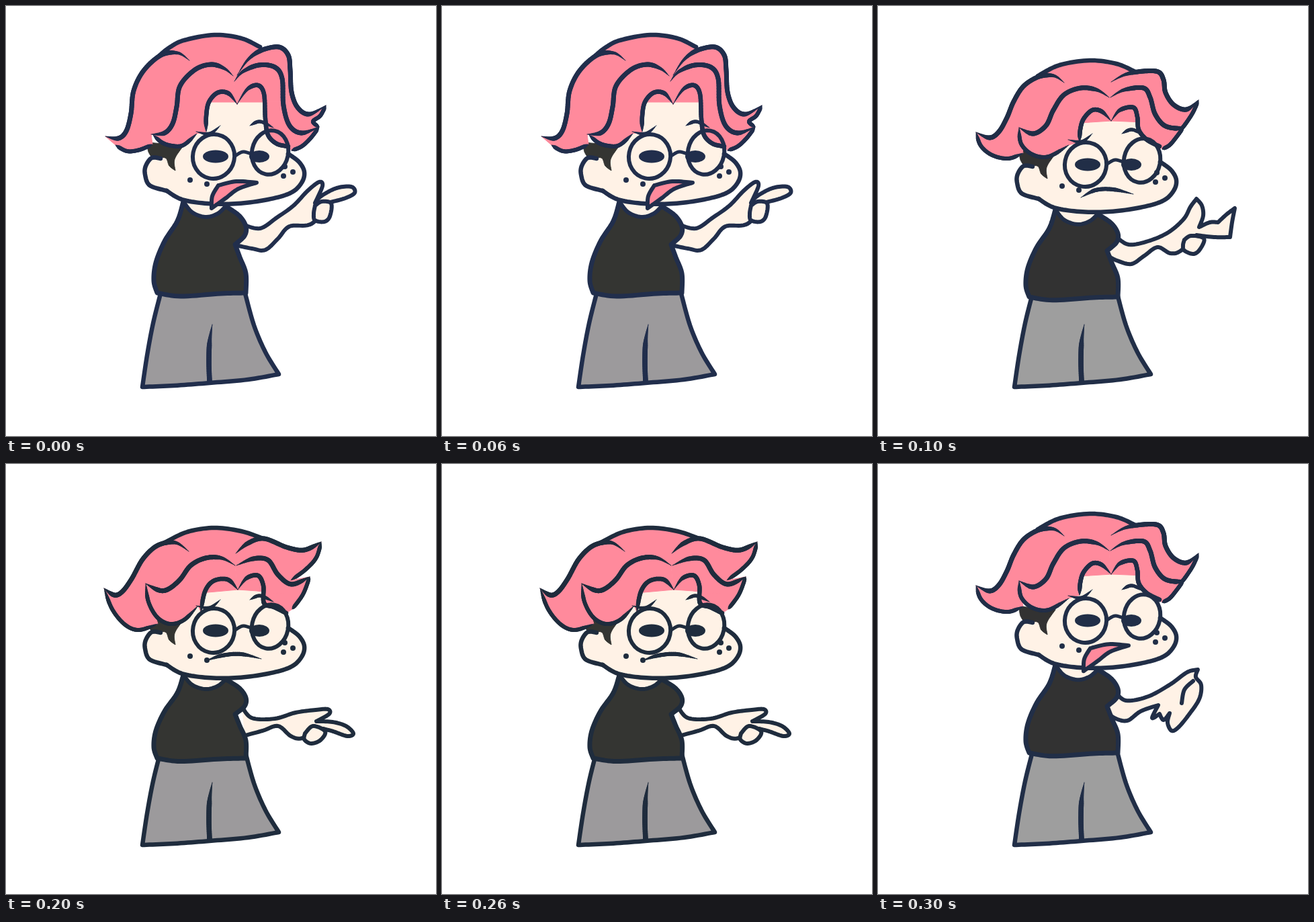
These frames come from a looping animation (640 by 640 pixels, 0.4 s). An HTML page with a canvas:

```html
<!DOCTYPE html>
<html lang="en">
<head>
<meta charset="utf-8">
<title>Pointing figure</title>
<style>
html, body { margin: 0; width: 100%; height: 100%; overflow: hidden; background: #fff; }
canvas { display: block; width: 640px; height: 640px; }
</style>
</head>
<body>
<canvas id="stage" width="640" height="640"></canvas>
<script>
const ctx = document.getElementById('stage').getContext('2d');
const PINK = '#ff8a9c', SKIN = '#fff2e6';
const STEP = 100;
let ink;

// Smooth curve through "x,y x,y"; "/" marks a sharp corner at the point before it.
function curve(text, dy = 0, scale = 1) {
  const out = [];
  let last = null;
  for (const part of text.split('/')) {
    const p = part.trim().split(/\s+/).map(s => {
      const [x, y] = s.split(',').map(Number);
      return [x, y * scale + dy];
    });
    if (last) p.unshift(last);
    last = p[p.length - 1];
    for (let i = 0; i < p.length - 1; i++) {
      const a = p[i - 1] || p[i], b = p[i], c = p[i + 1], d = p[i + 2] || c;
      for (let k = 0; k < 10; k++) {
        const t = k / 10;
        out.push([0, 1].map(n => b[n] + 0.5 * t * (c[n] - a[n] +
          t * (2 * a[n] - 5 * b[n] + 4 * c[n] - d[n] + t * (3 * (b[n] - c[n]) + d[n] - a[n])))));
      }
    }
    out.push(last);
  }
  return out;
}

function fill(color, ...parts) {
  ctx.beginPath();
  parts.flat().forEach(([x, y]) => ctx.lineTo(x, y));
  ctx.closePath();
  ctx.fillStyle = ctx.strokeStyle = color;
  ctx.lineWidth = 1;
  ctx.fill();
  ctx.stroke();
}

// Brush line; head and tail are the shares of the length that taper.
function line(pts, width = 6.5, head = 0, tail = 0) {
  ctx.strokeStyle = ink;
  if (!head && !tail) {
    ctx.beginPath();
    pts.forEach(([x, y]) => ctx.lineTo(x, y));
    ctx.lineWidth = width;
    ctx.stroke();
    return;
  }
  const n = pts.length - 1;
  for (let i = 0; i < n; i++) {
    const t = (i + 0.5) / n;
    const k = Math.min(1, head ? t / head : 1, tail ? (1 - t) / tail : 1);
    ctx.lineWidth = Math.max(1, width * k);
    ctx.beginPath();
    ctx.moveTo(...pts[i]);
    ctx.lineTo(...pts[i + 1]);
    ctx.stroke();
  }
}

function oval(x, y, rx, ry, tilt = 0, width = 0) {
  ctx.beginPath();
  ctx.ellipse(x, y, rx, ry, tilt, 0, Math.PI * 2);
  if (width) {
    ctx.lineWidth = width;
    ctx.strokeStyle = ink;
    ctx.stroke();
  } else {
    ctx.fillStyle = ink;
    ctx.fill();
  }
}

const hairUp = {
  cap: '228,74 243,62 265,51 310,43 350,48 378,61',
  left: '273,81 256,70 231,73 205,96 190,126 186,160 179,186 167,197 148,194',
  leftLow: '163,207 180,216 199,214 218,206',
  lockL: '338,104 325,93 305,87 281,95 259,119 254,150 248,175 236,189 216,191',
  lockLLow: '219,192 232,203 247,208 264,207 284,190',
  right: '344,103 360,80 380,66 406,61 420,73 423,95 425,128 434,151 451,161 476,148',
  rightLow: '476,148 468,163 457,172 466,180',
  lockR: '340,112 352,98 376,88 400,91 411,108 413,148 422,178 440,189 466,180',
  lockRLow: '466,180 454,196 440,209 425,215',
  faceL: '344,146 331,130 315,129 302,143 298,164 298,187',
  faceR: '344,146 359,124 375,118 384,131 386,168 390,192 403,205 420,209',
  edge: 143
};
const hairMid = {
  cap: '238,104 270,88 315,81 355,86 383,98',
  left: '277,114 262,104 240,105 217,119 202,142 192,166 180,187 166,196 146,188',
  leftLow: '146,188 153,208 170,222 194,227 216,219',
  lockL: '344,136 326,125 302,122 277,132 261,155 250,178 231,190 210,181',
  lockLLow: '210,181 213,205 230,221 254,224 284,207',
  right: '347,113 368,102 395,97 417,98 425,110 428,129 440,147 459,154 477,140',
  rightLow: '477,140 469,158 458,175 449,186',
  lockR: '346,136 366,125 395,122 405,136 412,160 425,177 442,182 455,180',
  lockRLow: '455,180 445,194 434,207 423,213',
  faceL: '347,171 333,157 319,155 306,168 301,184 300,202',
  faceR: '347,171 360,155 380,151 386,165 388,184 400,199 419,209',
  edge: 174
};
const hairLow = {
  cap: '236,117 270,101 310,95 350,100 380,110',
  left: '272,130 252,117 226,121 204,141 187,171 173,190 161,195 146,185',
  leftLow: '146,185 158,216 177,239 198,247 226,238',
  lockL: '341,151 321,140 297,140 275,151 259,172 242,186 228,188 208,178',
  lockLLow: '208,178 212,205 225,228 244,238 265,232 286,211',
  right: '342,133 360,118 384,111 418,124 444,128 469,116',
  rightLow: '469,116 462,139 446,157 424,173',
  lockR: '343,151 368,141 390,143 405,165 425,179 452,168',
  lockRLow: '452,168 442,194 426,216',
  faceL: '345,187 330,172 309,174 296,190 290,220',
  faceR: '345,187 358,170 375,166 383,181 384,207 399,213 417,222',
  edge: 192
};

const openMouth = '306,301 307,283 316,267 / 343,261 373,263 / 346,272 327,286 306,301';

const poses = [
  {
    ink: '#212e4c', shirt: '#343532', pants: '#9c9a9c',
    head: 0, dots: 0, top: 0, hem: 0, hair: hairUp, hairDy: 0, open: true,
    arm: '352,325 378,331 403,315 428,297 449,275 466,262 471,268 460,293 / 469,283 492,271 514,269 519,278 505,286 483,292 / 455,324 422,328 405,346 386,363 366,361 342,356',
    finger: '460,297 470,291 484,294 482,313 474,321 460,319 458,309 460,297'
  },
  {
    ink: '#212e47', shirt: '#323232', pants: '#9e9e9e',
    head: 12, dots: 9, top: 12, hem: 6, hair: hairMid, hairDy: 0,
    mouth: '302,285 324,274 350,273 380,280',
    arm: '354,343 373,355 402,350 432,337 455,317 465,299 474,287 / 482,297 484,312 478,329 / 494,322 506,322 / 519,310 531,301 / 527,322 524,344 / 500,344 474,341 / 451,364 435,368 416,359 396,372 377,384 356,379 344,373',
    finger: '456,348 466,342 485,346 480,361 470,369 456,364 454,356 456,348'
  },
  {
    ink: '#1f2c3d', shirt: '#343532', pants: '#9c9a9c',
    head: 24, dots: 27, top: 23, hem: 11, hair: hairLow, hairDy: 0,
    mouth: '297,293 322,285 350,283 380,290',
    arm: '351,361 366,378 400,379 431,370 461,366 479,365 481,372 462,383 / 486,384 506,390 517,401 508,405 487,398 472,394 / 441,408 424,405 405,390 382,397 356,404',
    finger: '445,401 457,390 475,398 468,411 454,416 444,410 445,401'
  },
  {
    ink: '#212e47', shirt: '#323232', pants: '#9e9e9e',
    head: 9, dots: 12, top: 8, hem: 3, hair: hairMid, hairDy: -7, open: true,
    arm: '352,338 369,352 402,346 435,328 460,310 476,306 / 473,317 481,329 478,350 462,374 447,392 437,397 431,385 434,371 / 425,381 419,372 / 408,378 417,359 / 391,368 371,382 352,378 340,368',
    crease: '469,323 456,336 452,356'
  }
];

function drawBody(p) {
  const leg = curve('230,428 219,472 210,520 203,567 / 250,565 303,561 360,556 406,548 / 386,515 369,475 356,428');
  fill(p.pants, leg);
  line(leg);
  line(curve('307,474 303,500 302,530 303,560'), 7.5, 0.4);

  const arm = curve(p.arm);
  fill(SKIN, arm);
  line(arm, 6);
  if (p.finger) {
    const finger = curve(p.finger);
    fill(SKIN, finger);
    line(finger, 6);
  }
  if (p.crease) line(curve(p.crease), 6);

  // The shirt stretches between its collar and its hem.
  const scale = 1 + (p.hem - p.top) / 135;
  const dy = p.top + 292 * (1 - scale);
  const neck = curve('264,291 277,307 297,314 315,309 327,298', dy, scale);
  const shirt = curve('327,298 347,312 357,328 355,342 341,355 / 348,374 357,398 357,427 / 320,428 260,432 225,427 / 220,409 223,382 236,350 255,320 264,291', dy, scale);
  fill(SKIN, neck);
  fill(p.shirt, neck, shirt);
  line(neck, 6);
  line(shirt, 7);
}

function drawHair(p) {
  const h = {};
  for (const key in p.hair) {
    if (key !== 'edge') h[key] = curve(p.hair[key], p.hairDy);
  }
  const back = key => [...h[key]].reverse();
  const edge = p.hair.edge + p.hairDy;
  const flat = pts => pts.map(([x, y]) => [x, Math.min(y, edge)]);

  fill(PINK, h.left, h.leftLow, back('lockL'));
  fill(PINK, h.right, h.rightLow, back('lockR'));
  fill(PINK, h.cap, [h.right[0], h.lockR[0], h.lockL[0], h.left[0]]);
  fill(PINK, h.lockL, h.lockLLow, back('faceL'));
  fill(PINK, h.lockR, h.lockRLow, back('faceR'));
  fill(PINK, [h.lockL[0], h.lockR[0], h.faceR[0]]);
  fill(PINK, flat(h.faceL));
  fill(PINK, flat(h.faceR));

  line(h.cap, 6.5);
  for (const key of ['left', 'lockL', 'right', 'lockR']) line(h[key], 7, 0.2, 0.12);
  for (const key of ['leftLow', 'lockLLow', 'rightLow', 'lockRLow']) line(h[key], 6, 0.15, 0.15);
  line(h.faceL, 6.5, 0.2, 0.12);
  line(h.faceR, 6.5, 0.2);
}

function drawFace(p) {
  const dy = p.head;
  const ear = curve('230,227 217,226 208,238 207,251 214,267 239,275', dy);
  const jaw = curve('239,275 262,288 300,294 345,294 390,288 424,278 440,263 444,247 436,232 420,220', dy);
  fill(SKIN, ear, jaw, curve('420,215 388,143 / 300,143 / 252,206 / 230,227', dy));
  fill(p.shirt, curve('210,203 212,217 219,228 / 237,226 243,238 252,245 / 251,228 264,208', dy));
  line(ear, 6.5);
  line(jaw, 6.5);

  drawHair(p);

  oval(309, 224 + dy, 31, 33, 0.2, 6);
  oval(393, 218 + dy, 27, 33, 0.2, 6);
  line(curve('341,223 353,217 367,221', dy), 5);
  oval(312, 224 + dy, 19, 9.5);
  oval(377, 224 + dy, 15, 9);
  line(curve('283,187 303,190 319,178', dy), 5, 0.4, 0.4);
  line(curve('363,178 378,172 398,181', dy), 5, 0.3, 0.3);

  for (const [x, y] of [[274, 259], [299, 265], [415, 239], [413, 253], [427, 247]]) {
    oval(x, y + p.dots, 4, 4);
  }
  if (p.open) {
    const mouth = curve(openMouth, dy * 0.8);
    fill(PINK, mouth);
    line(mouth, 6);
  } else {
    line(curve(p.mouth), 6, 0.3, 0.3);
  }
}

ctx.lineCap = ctx.lineJoin = 'round';

function draw() {
  const p = poses[Math.floor(performance.now() / STEP) % poses.length];
  ink = p.ink;
  ctx.fillStyle = '#fff';
  ctx.fillRect(0, 0, 640, 640);
  drawBody(p);
  drawFace(p);
  requestAnimationFrame(draw);
}
draw();
</script>
</body>
</html>
```
